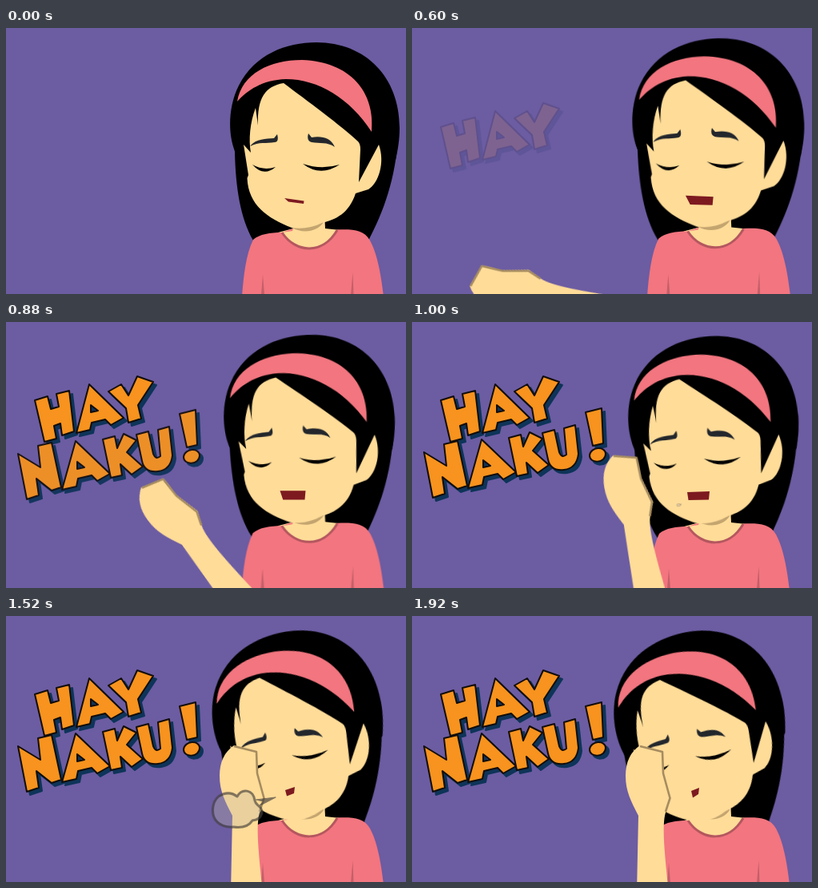
Animation, 500 px wide and 333 px high, one loop 2880 ms. Source, as an HTML page:

```html
<!DOCTYPE html>
<html lang="tl">
<head>
<meta charset="utf-8">
<title>Hay naku!</title>
<style>
html, body { margin: 0; width: 100%; height: 100%; overflow: hidden; background: #6c5ca2; }
svg { display: block; width: 100%; height: 100%; }

.skin { fill: #ffdc98; }
.pink { fill: #f2757f; }
.ink { fill: #23272c; }
.crease { fill: #c45f69; }
.fill { fill: #f7931e; stroke: #120d0a; stroke-width: 2; stroke-linejoin: round; }
.shade { fill: #0e3459; stroke: #0e3459; stroke-width: 2; stroke-linejoin: round; }

.head, .mane, .body, .arm, .mouth, .brow, .puff, .line {
  animation: 2880ms linear infinite;
}
.head { --k: 1; transform-origin: 395px 250px; animation-name: nod; }
.mane { --k: .71; transform-origin: 395px 300px; animation-name: nod; }
.body { transform-origin: 383px 333px; animation-name: breathe; }
.arm { transform-origin: 296px 357px; animation-name: swing; }
.mouth { fill: #7d1a20; animation-name: speak; }
.brow { animation-name: frown; }
.brow.left { --rest: translate(4px, 4px); }
.brow.right { --rest: translate(2px, 5.5px); }
.puff { transform-origin: 337px 228px; animation-name: puff; }
.line.one { animation-name: line-one; }
.line.two { animation-name: line-two; }

@keyframes nod {
  0% { transform: translate(0, 0) scale(1) rotate(0deg); }
  11.11% { transform: translate(-.5px, -1.2px) scale(1.011) rotate(calc(var(--k) * -.5deg)); }
  19.44% { transform: translate(-.5px, -2.4px) scale(1.014) rotate(calc(var(--k) * -1deg)); }
  26.39% { transform: translate(-.3px, -1.2px) scale(1.012) rotate(calc(var(--k) * -1.8deg)); }
  34.72% { transform: translate(-.8px, -.5px) scale(1.003) rotate(calc(var(--k) * -3.8deg)); }
  45.83% { transform: translate(-.8px, 0) scale(1, 1.007) rotate(calc(var(--k) * -7.4deg)); }
  52.78% { transform: translate(-1.2px, 0) scale(1, 1.011) rotate(calc(var(--k) * -9.4deg)); animation-timing-function: ease-out; }
  66.67%, 100% { transform: translate(-1.4px, 0) scale(1, 1.015) rotate(calc(var(--k) * -11.7deg)); }
}
@keyframes breathe {
  0% { transform: scale(1); }
  11.11%, 26.39% { transform: scale(1.012, 1.02); }
  34.72%, 100% { transform: scale(1); }
}
@keyframes swing {
  0%, 12.5% { transform: translate(-60px, 70px) rotate(-90deg); }
  19.44% { transform: translate(-40px, 8px) rotate(-76deg); }
  26.39% { transform: translate(-5px, 1px) rotate(-70deg); animation-timing-function: ease-in; }
  30.55% { transform: translate(-2px, 0) rotate(-37deg); animation-timing-function: ease-out; }
  34.72% { transform: translate(0, 0) rotate(-10deg); animation-timing-function: ease-out; }
  41.67%, 100% { transform: translate(0, 0) rotate(0deg); }
}
@keyframes speak {
  0% { d: path("M348 213L372.5 216.5L372 220L353 217.5Z"); }
  11.11% { d: path("M343.5 210L376 212.5L375 220.5L349 219.5Z"); }
  26.39% { d: path("M341 209.5L377 210.5L376 222.5L347 222Z"); }
  34.72% { d: path("M344 213L372 212L371 222.5L345.5 223Z"); }
  45.83% { d: path("M348 216.5L364 213.5L362.5 222.5L350 225Z"); }
  52.78% { d: path("M349 218L361 214L360 222L351 225.5Z"); }
  66.67%, 100% { d: path("M349 219L359 215L358 223L351 227.5Z"); }
}
@keyframes frown {
  0% { transform: translate(0, 0); }
  11.11%, 26.39% { transform: translate(0, -3.5px); }
  34.72% { transform: translate(0, 0); }
  48.61%, 100% { transform: var(--rest); }
}
@keyframes puff {
  0%, 33.2% { transform: scale(0); opacity: 1; }
  45.83% { transform: scale(.64); opacity: 1; }
  52.78% { transform: scale(1); opacity: .68; }
  61.1%, 100% { transform: scale(1.42); opacity: 0; }
}
@keyframes line-one {
  0%, 19.44% { transform: translateY(30px); opacity: 0; }
  29.86%, 100% { transform: translateY(0); opacity: 1; }
}
@keyframes line-two {
  0%, 20.83% { transform: translateY(30px); opacity: 0; }
  31.25%, 100% { transform: translateY(0); opacity: 1; }
}
</style>
</head>
<body>
<svg viewBox="0 0 500 333" preserveAspectRatio="none">
  <defs>
    <path id="hay" fill-rule="evenodd" d="
      M36 98L52 93L56 109L66 106L63 90L79 86L85 137L70 142L68 127L60 130L63 146L48 150Z
      M104 78L147 120L131 129L124 122L107 126L105 135L88 139ZM106 104L115 111L106 113Z
      M128 87L144 78L153 92L164 68L184 75L165 104L169 121L153 126L150 108Z"/>
    <path id="naku" fill-rule="evenodd" d="
      M15 163L43 180L40 153L57 149L69 205L57 209L38 194L41 215L26 220Z
      M87 147L130 188L114 197L107 190L90 194L88 204L70 208ZM89 173L98 180L89 182Z
      M121 145L136 141L139 156L147 138L163 146L151 161L171 179L157 189L143 176L145 190L131 193Z
      M163 139L178 135L184 163Q187 171 193 166L190 133L204 129L208 165Q206 183 190 185Q173 187 170 172Z
      M217 113L237 108L239 152L226 155Z
      M222 167C223 156 242 155 242 165C242 177 222 178 222 167Z"/>
  </defs>

  <rect width="500" height="333" fill="#6c5ca2"/>

  <g role="img" aria-label="HAY NAKU!">
    <g class="line one">
      <use href="#hay" class="shade" x="4" y="4"/>
      <use href="#hay" class="fill"/>
    </g>
    <g class="line two">
      <use href="#naku" class="shade" x="4" y="4"/>
      <use href="#naku" class="fill"/>
    </g>
  </g>

  <path class="mane" d="M283 130L286 155C287 200 293 238 309 266L330 295H430L453 266C472 230 487 190 491 130Z"/>

  <g class="body">
    <path class="skin" d="M359 230V251L340 256L350 278H400L418 253L399 251L398 230Z"/>
    <path fill="#c4a56f" d="M357 250C372 258 389 255 397 243V232H357Z"/>
    <path class="pink" d="M345 256C330 256 317 258 309 265C300 283 297 310 295 336H472C468 302 463 281 455 266C447 252 433 252 414 252.500C396 284 362 282 345 256Z"/>
    <path class="pink" d="M345 256L359 251L358 254Z"/>
    <path fill="none" stroke="#b4575f" stroke-width="3" d="M345 256C362 282 396 284 414 253"/>
    <path class="crease" d="M321 309L323 334H319Z"/>
    <path class="crease" d="M433.500 306L434.500 334H431Z"/>
  </g>

  <g class="head">
    <path d="M286 154C277 132 278 97 291 72C311 33 350 18 388 18C450 18 492 62 492 125C492 140 490 152 487 165L440 200L310 190Z"/>
    <path class="skin" d="M347 69C375 90 420 123 440 142Q443 145 443 152L441 193L466 146C474 168 466 194 453 202L437 207C429 232 412 240 395 244C383 250 370 252 357 250C327 238 303 222 301.500 188L303 184L297 146L306 156C303 140 305 118 312 100L315 122C314 87 324 73 347 69Z"/>
    <path class="pink" d="M289 92C295 57 330 40 370 40C430 42 462 80 457 130C430 88 390 64 350 64C320 65 302 78 289 92Z"/>
    <path class="ink brow left" d="M305 148C313 138 325 139 335 138L339 133C341 140 339 143 336 143C325 145 317 142 305 148Z"/>
    <path class="ink brow right" d="M378 132L382 137C394 135 406 137 411 149C401 142 392 145 382 143C378 142 376 139 378 132Z"/>
    <path d="M308 171Q322 179 337 174Q322 187 308 171Z"/>
    <path d="M371 170Q394 178 417 171Q393 187 371 170Z"/>
  </g>

  <path class="mouth" d="M348 213L372.500 216.500L372 220L353 217.500Z"/>

  <g class="arm">
    <path class="skin" d="M285 162L314 170L315 197L324 228L317 246C312 262 316 300 321 346H281L283 250C274 232 267 220 267 200C267 183 273 170 285 162Z"/>
    <path fill="none" stroke="#a68c60" stroke-width="2.600" stroke-linejoin="round" d="M285 163L313 170L314 197L322.500 228L317 245"/>
  </g>

  <g class="puff" fill="#bdb8aa" fill-opacity=".5" stroke="#45413f" stroke-width="3" stroke-linejoin="round">
    <path d="M311 231C309 217 295 215 289 226C279 218 262 222 259 238C256 256 268 265 284 264C297 266 304 262 308 256C322 254 322 242 316 238C314 236 312 235 311 231Z"/>
    <path fill="#45413f" fill-opacity="1" stroke-width="1" d="M312 230L337 227L316 238L322 232Z"/>
  </g>
</svg>
</body>
</html>
```
